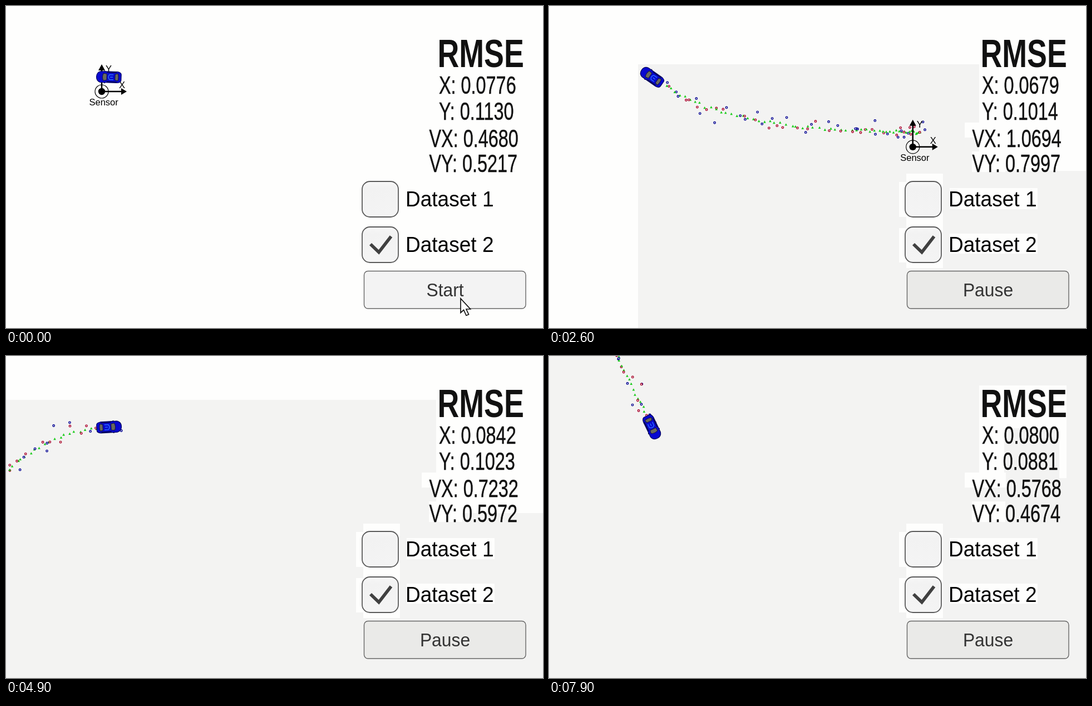
Recreate the animation shown at these times as an HTML page. Size 965 px wide and 580 px high, loop 8000 ms.

```html
<!DOCTYPE html>
<html lang="en">
<head>
<meta charset="utf-8">
<title>Tracking simulator</title>
<style>
  html, body { margin: 0; width: 100%; height: 100%; overflow: hidden; background: #fefefd; }
  svg { display: block; width: 965px; height: 580px; font-family: "Liberation Sans", Arial, sans-serif; }
  .label { font-size: 39px; }
  .box { fill: url(#face); stroke: #5a5a5a; stroke-width: 1.8; }
  .row { font-size: 45px; fill: #111; stroke: #111; stroke-width: .5; }
  .lidar, .radar { fill: #fff; stroke-width: 1.4; }
  .lidar { stroke: #a8002a; }
  .radar { stroke: #000090; }
  .guess { fill: #1ccc1c; }
</style>
</head>
<body>
<svg viewBox="0 0 965 580">
  <defs>
    <linearGradient id="face" x2="0" y2="1">
      <stop offset="0" stop-color="#f7f7f7"/>
      <stop offset=".2" stop-color="#f2f2f2"/>
      <stop offset="1" stop-color="#f4f4f4"/>
    </linearGradient>
  </defs>

  <path id="ground" fill="#f3f3f2"/>
  <path id="patches" fill="#fefefd" d="M773 53h157v167h-13v-90h-99v80h-45z M747 210h74v27h-74z M760 262h60v37h-60z
    M642 302h66v170h-66z M629 317h13v63h-13z M629 400h13v62h-13z M720 328h158v38h-158z M720 410h158v36h-158z"/>

  <g id="world">
    <g id="trail"></g>
    <g font-size="16.5">
      <circle r="12" fill="none" stroke="#000" stroke-width="1.2"/>
      <circle r="6.2"/>
      <path d="M0 0V-42M0 0H38" stroke="#000" stroke-width="2.5"/>
      <path d="M0-49l6 11h-12zM45 0l-10-6v12z"/>
      <text x="7" y="-35">Y</text>
      <text x="31" y="-6">X</text>
      <text x="-22.5" y="25">Sensor</text>
    </g>
  </g>

  <g id="car">
    <path d="M-9-11l3 2M-9 11l3-2" stroke="#101050" stroke-width="2"/>
    <path d="M-15-10H15Q22-9 22-5V5Q22 9 15 10H-15Q-22.500 8-22.500 0T-15-10z" fill="#0808d0" stroke="#04045c" stroke-width="1.2"/>
    <path d="M-4-8.500H14M-4 8.500H14" stroke="#080840" stroke-width="1.5"/>
    <path d="M-10-6.500L-4-5.500V5.500L-10 6.500Q-13 0-10-6.500z" fill="#69695f" stroke="#181840"/>
    <path d="M11-5l5-1.500q2 6.500 0 13L11 5z" fill="#69695f" stroke="#181840"/>
    <path d="M8-4.500H1Q-3 0 1 4.500H8M7 0H2" fill="none" stroke="#2f78ff" stroke-width="1.3"/>
  </g>

  <g transform="translate(775.500 110) scale(.757 1)"><text font-size="71" font-weight="700" fill="#111">RMSE</text></g>
  <g id="rows"></g>

  <rect class="box" x="640" y="316" width="65" height="64" rx="14"/>
  <rect class="box" x="640" y="398" width="65" height="64" rx="14"/>
  <path d="M655 429L670 443.500L692 415" fill="none" stroke="#404040" stroke-width="5.800"/>
  <g transform="translate(718 361) scale(.95 1)"><text class="label">Dataset 1</text></g>
  <g transform="translate(718 443) scale(.95 1)"><text class="label">Dataset 2</text></g>

  <rect id="button" x="643.500" y="477.500" width="290.500" height="67.500" rx="7" stroke="#666" stroke-width="1.400"/>
  <g transform="translate(789 523) scale(.95 1)"><text id="caption" font-size="33.500" fill="#333" text-anchor="middle"></text></g>
  <path id="cursor" d="M817 527V552.500L822.500 547.500L827 557.500L831.500 555.500L827 546H834.500z" fill="#fff" stroke="#111" stroke-width="1.700"/>
</svg>

<script>
const LOOP = 8000, FRAME = 100;
const PRESS = 700, GO = 980;     // button press, start of the drive
const LEG = 460, STEP = 27;      // ms between route points, between readings
const CAR = { x: 185, y: 128 };
const NS = "http://www.w3.org/2000/svg";
const $ = id => document.getElementById(id);

function make(tag, attrs, parent) {
  const el = document.createElementNS(NS, tag);
  for (const k in attrs) el.setAttribute(k, attrs[k]);
  parent.append(el);
  return el;
}

// Car relative to the sensor, one point per leg
const route = [
  [13, -26], [-68, -29], [-229, -40], [-392, -82], [-530, -178], [-618, -320],
  [-640, -489], [-570, -642], [-436, -743], [-268, -758], [-109, -706],
  [22, -603], [108, -474], [183, -329], [258, -184], [327, -43], [395, 103]
];
const last = route.length - 1;

// Catmull-Rom spline through the route
function carAt(t) {
  const u = Math.min(Math.max((t - GO) / LEG, 0), last);
  const i = Math.min(Math.floor(u), last - 1), f = u - i;
  const [a, b, c, d] = [-1, 0, 1, 2].map(k => route[Math.min(Math.max(i + k, 0), last)]);
  const [x, y] = [0, 1].map(k => b[k] + f / 2 * (c[k] - a[k]
    + f * (2 * a[k] - 5 * b[k] + 4 * c[k] - d[k] + f * (3 * (b[k] - c[k]) + d[k] - a[k]))));
  return { x, y };
}

let seed = 29;
const rand = () => (seed = seed * 16807 % 2147483647) / 2147483647;
const noise = sd => (rand() + rand() + rand() + rand() - 2) * 1.73 * sd;

// One estimate per step; lidar and radar readings take turns.
const steps = [];
for (let t = GO; t < LOOP; t += STEP) {
  const radar = steps.length % 2, sd = radar ? 10 : 6;
  const p = carAt(t), g = make("g", {}, $("trail"));
  make("path", { class: "guess", d: `M${p.x + noise(1.3)} ${p.y + noise(1.3) - 2.3}l2.300 4.300h-4.600z` }, g);
  make("circle", { class: radar ? "radar" : "lidar", r: 1.7,
                   cx: p.x + noise(sd), cy: p.y + noise(sd) }, g);
  steps.push({ t, g });
}

// Counters: the value before the press, then key values at the given times
const times = [GO, 1900, 3300, 4200, 5600, 6500, 7900];
const rows = [
  counter("X", 778, 157.5, 0.0776, [0, 0.0618, 0.0740, 0.0857, 0.0826, 0.0850, 0.0800]),
  counter("Y", 778, 204.5, 0.1130, [0, 0.0902, 0.1127, 0.1073, 0.0973, 0.0920, 0.0881]),
  counter("VX", 760.5, 253.5, 0.4680, [0, 1.3224, 0.8164, 0.7773, 0.6690, 0.6377, 0.5768]),
  counter("VY", 760.5, 298.5, 0.5217, [0, 0.8799, 0.7195, 0.6312, 0.5631, 0.5186, 0.4674])
];

function counter(name, x, y, before, keys) {
  const g = make("g", { transform: `translate(${x} ${y}) scale(.72 1)` }, $("rows"));
  return { name, before, keys, text: make("text", { class: "row" }, g) };
}

function valueAt({ before, keys }, t) {
  if (t < PRESS) return before;
  const i = times.findIndex(end => t <= end);
  if (i < 1) return i ? keys[keys.length - 1] : keys[0];
  return keys[i - 1] + (keys[i] - keys[i - 1]) * (t - times[i - 1]) / (times[i] - times[i - 1]);
}

// The grey ground widens as the car comes round the bend, then fills the stage.
function groundAt(t) {
  if (t < GO) return "";
  if (t >= 5800) return "M0 0H965V580H0z";
  return t < 4500 ? "M160 105H773V297H965V580H160z" : "M0 79H773V283H965V580H0z";
}

function draw(t) {
  const p = carAt(t), a = carAt(t - 20), b = carAt(Math.max(t, GO) + 20);
  const turn = Math.atan2(b.y - a.y, b.x - a.x) * 180 / Math.PI - 180;
  $("world").setAttribute("transform", `translate(${CAR.x - p.x} ${CAR.y - p.y})`);
  $("car").setAttribute("transform", `translate(${CAR.x} ${CAR.y}) rotate(${turn})`);
  for (const step of steps) step.g.style.display = step.t <= t ? "" : "none";
  for (const row of rows) row.text.textContent = `${row.name}: ${valueAt(row, t).toFixed(4)}`;

  const on = t >= PRESS;
  $("caption").textContent = on ? "Pause" : "Start";
  $("button").setAttribute("fill", on ? "#eaeae8" : "#f3f3f3");
  $("cursor").style.display = on ? "none" : "";
  $("ground").setAttribute("d", groundAt(t));
  $("patches").style.display = t < GO ? "none" : "";
}

const begin = performance.now();
function tick() {
  const t = (performance.now() - begin) % LOOP;
  draw(Math.floor(t / FRAME) * FRAME);
  requestAnimationFrame(tick);
}
tick();
</script>
</body>
</html>
```
